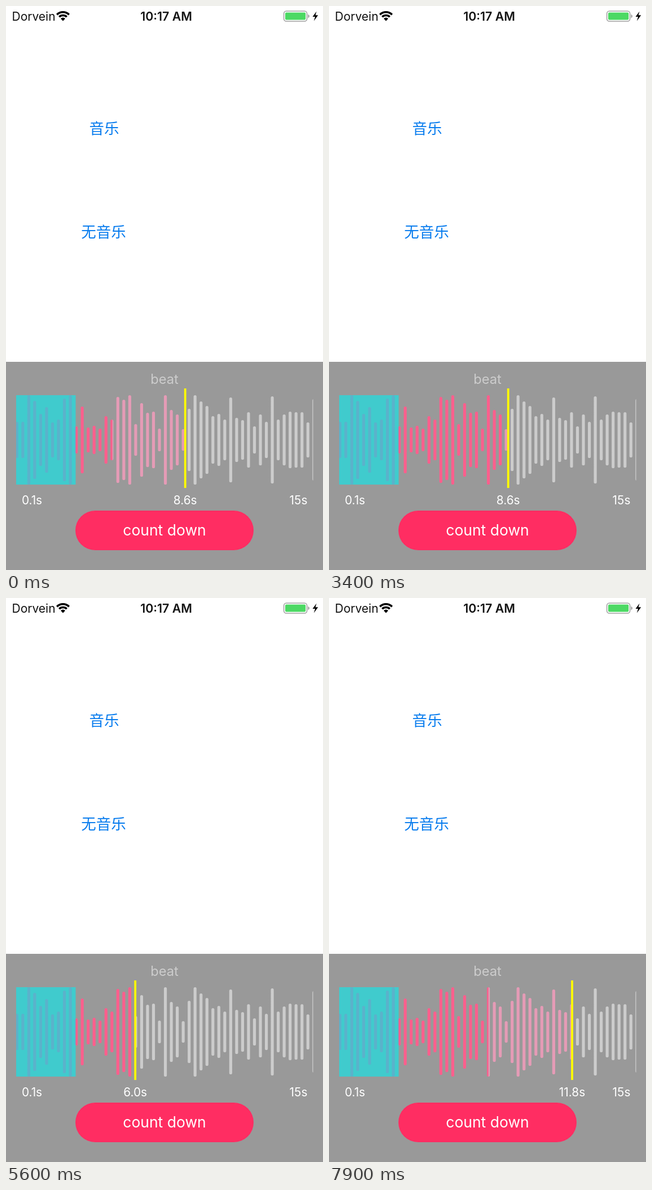
Write an HTML page that moves like this. It is 562 by 997 pixels and loops after 8 s.

```html
<!DOCTYPE html>
<html lang="zh">
<head>
<meta charset="utf-8">
<title>Music trimmer</title>
<style>
  html, body { margin: 0; width: 100%; height: 100%; overflow: hidden; background: #fff; }
  svg { display: block; width: 100%; height: 100%; }
  text { font-family: Inter, Roboto, "Noto Sans CJK SC", "Noto Sans CJK", sans-serif; }
  .mid { text-anchor: middle; }
  .status { font-size: 21px; fill: #111; }
  .clock { font-size: 21.3px; font-weight: 600; }
  .link { font-family: "Noto Sans CJK SC", "Noto Sans CJK", sans-serif; font-size: 26.5px; fill: #087cee; }
  .time { font-size: 20.8px; fill: #fff; }
  .bars { fill: none; stroke-width: 5.2; stroke-linecap: round; }
</style>
</head>
<body>
<svg viewBox="0 0 562 997" preserveAspectRatio="none">
  <defs>
    <clipPath id="clipHead"><rect x="18" y="680" width="105.5" height="175"/></clipPath>
    <clipPath id="clipDone"><rect id="done" x="123.5" y="680" width="0" height="175"/></clipPath>
    <clipPath id="clipNext"><rect id="next" x="123.5" y="680" width="0" height="175"/></clipPath>
    <clipPath id="clipRest"><rect id="rest" x="123.5" y="680" width="0" height="175"/></clipPath>
    <path id="wave"/>
  </defs>
  <rect width="562" height="997" fill="#fff"/>

  <text class="status" x="10.5" y="25.6">Dorvein</text>
  <g fill="none" stroke="#000" stroke-width="3.6">
    <path d="M90.2 15.2A15.3 15.3 0 0 1 111.8 15.2"/>
    <path d="M94.3 19.3A9.5 9.5 0 0 1 107.7 19.3"/>
  </g>
  <path d="M101 26.5L97 22.2A5.7 5.7 0 0 1 105 22.2Z"/>
  <text class="status clock mid" x="284" y="25.6">10:17 AM</text>
  <rect x="492.6" y="9" width="41" height="18" rx="4.5" fill="none" stroke="#a3a3a3" stroke-width="1.6"/>
  <rect x="495" y="11.4" width="36.2" height="13.2" rx="2" fill="#4cd964"/>
  <path d="M535.4 14.8Q538 15.5 538 18T535.4 21.2Z" fill="#a3a3a3"/>
  <path d="M550.5 9.5L543.5 19H548L545.8 26.5L553.2 16.3H548.6Z"/>

  <text class="link mid" x="174" y="226">音乐</text>
  <text class="link mid" x="173" y="408.5">无音乐</text>

  <rect y="629" width="562" height="368" fill="#999"/>
  <text class="mid" x="281" y="668" font-size="23.7" fill="#ccc">beat</text>

  <rect x="18" y="688" width="105.5" height="158" fill="#40cbcd"/>
  <g class="bars">
    <g clip-path="url(#clipHead)"><use href="#wave" stroke="#5bb2cb"/></g>
    <g clip-path="url(#clipRest)"><use href="#wave" stroke="#ccc"/></g>
    <g clip-path="url(#clipNext)"><use href="#wave" stroke="#e59bb6"/></g>
    <g clip-path="url(#clipDone)"><use href="#wave" stroke="#fb5f8d"/></g>
  </g>
  <rect id="line" y="676" width="3.8" height="176" fill="#fffa00"/>

  <text class="time mid" x="46" y="880.5">0.1s</text>
  <text class="time mid" id="label" y="880.5"></text>
  <text class="time mid" x="518.5" y="880.5">15s</text>

  <rect x="123" y="892" width="316" height="70" rx="35" fill="#ff2d62"/>
  <text class="mid" x="281" y="936.3" font-size="26.5" fill="#fff">count down</text>
</svg>
<script>
  const $ = id => document.getElementById(id);
  const LOOP = 8000, STEP = 100;
  const START = 123.5, END = 544.5, SPEED = 0.0351; // px per ms

  // half height of each bar
  const halves = [
    32, 32, 79, 69, 46, 58, 31, 36, 73, 79, 24, 59, 22, 25, 20, 42, 36,
    76, 71, 79, 28, 65, 48, 50, 20, 79, 53, 45, 19, 55, 79, 68, 60,
    42, 46, 36, 75, 39, 35, 49, 24, 45, 32, 77, 36, 45, 50, 49, 49, 31, 72];
  $('wave').setAttribute('d', halves.map((h, i) =>
    `M${(19.3 + 10.53 * i).toFixed(2)} ${769.6 - h}V${764.4 + h}`).join(''));

  // playback runs: start time, start position, pause time
  const runs = [
    [0, 188.5, 3750], [3800, START, 4200], [4820, 293.2, 5150],
    [5700, START, 6100], [7050, 252.7, LOOP]];
  // handle positions: time, x
  const drag = [
    [0, 317.7], [4200, 317.7], [4800, 398.5], [5150, 398.5], [5700, 213],
    [6320, 213], [7000, 358], [7600, 358], [7900, 431], [LOOP, 431]];

  function handleAt(t) {
    const i = drag.findIndex(p => p[0] > t);
    const [t0, a] = drag[i - 1], [t1, b] = drag[i];
    const k = (t - t0) / (t1 - t0);
    return a + (b - a) * k * k * (3 - 2 * k);
  }

  function playedAt(t) {
    const [t0, x, stop] = runs.filter(r => r[0] <= t).pop();
    return x + (Math.min(t, stop) - t0) * SPEED;
  }

  function span(id, from, to) {
    $(id).setAttribute('x', from);
    $(id).setAttribute('width', Math.max(0, to - from));
  }

  function draw(t) {
    const x = handleAt(t), played = Math.min(playedAt(t), x);
    span('done', START, played);
    span('next', played, x);
    span('rest', x, END);
    $('line').setAttribute('x', x - 1.9);
    $('label').setAttribute('x', x);
    $('label').textContent = ((x - 17.4) * 15 / 526.5).toFixed(1) + 's';
  }

  let origin;
  function tick(now) {
    origin ??= now;
    draw(Math.floor((now - origin) % LOOP / STEP) * STEP);
    requestAnimationFrame(tick);
  }
  draw(0);
  requestAnimationFrame(tick);
</script>
</body>
</html>
```
